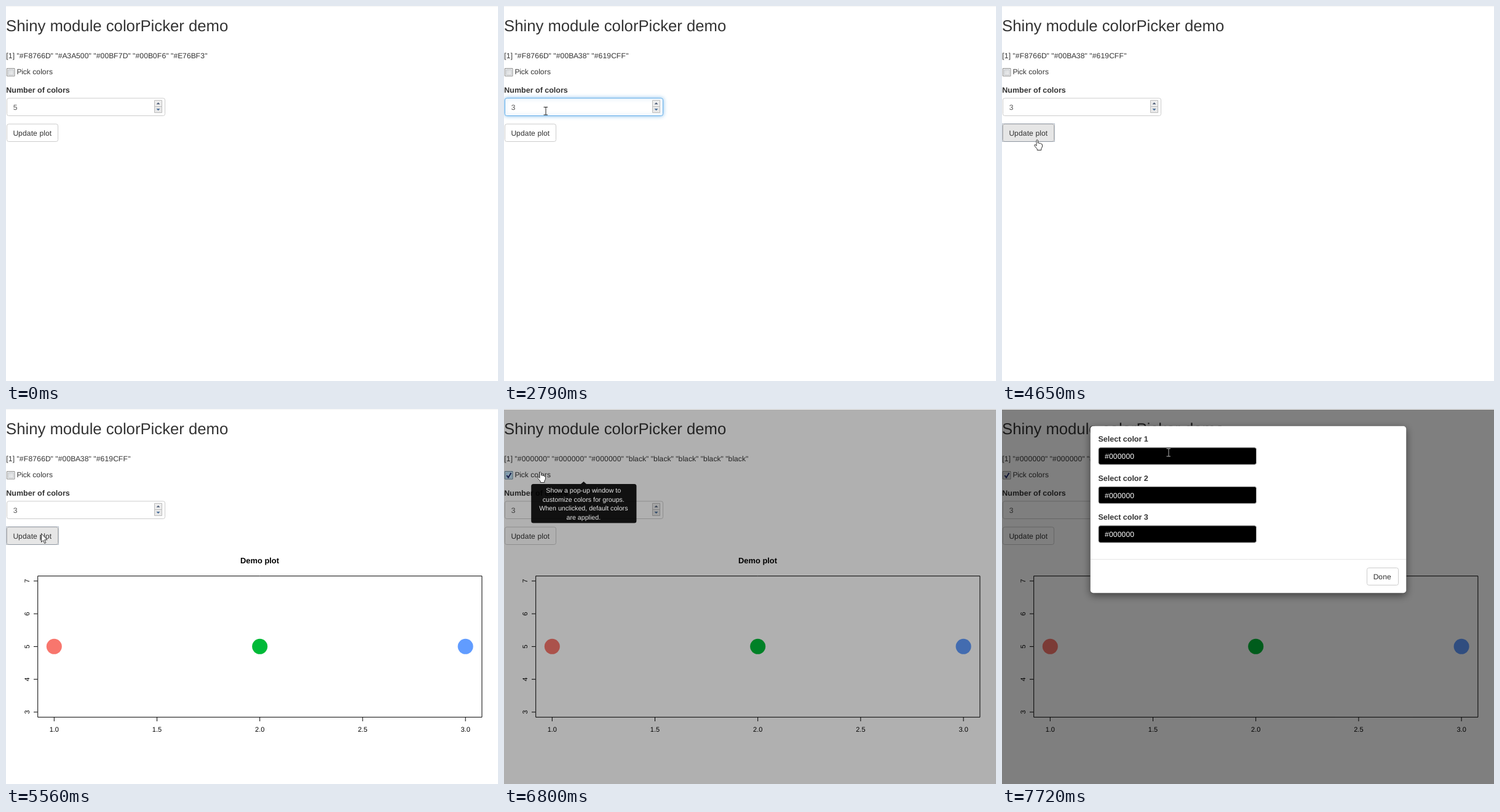
An HTML page with a canvas for the animation above (8000 ms loop, 800x610 px).

```html
<!DOCTYPE html>
<html lang="en">
<head>
<meta charset="utf-8">
<title>Color picker demo</title>
<style>
  html, body { margin: 0; width: 100%; height: 100%; overflow: hidden; background: #fff; }
  canvas { display: block; }
</style>
</head>
<body>
<canvas id="stage" width="800" height="610"></canvas>
<script>
const ctx = document.getElementById('stage').getContext('2d');
const LOOP = 8000;
const ZOOM = 0.861;
const FONT = '"Liberation Sans", Arial, sans-serif';
const BLACKS = '"#000000" "#000000" "#000000" "black" "black" "black" "black" "black"';

// Each step lists what changes at its time; the rest carries over.
const steps = [
  { at: 0, codes: '"#F8766D" "#A3A500" "#00BF7D" "#00B0F6" "#E76BF3"', count: 5,
    cursor: null, click: false, focus: false, caret: false, check: 'idle', checked: false,
    button: 'idle', tip: 0, plot: false, dim: 0, modal: false },
  { at: 300, cursor: ['arrow', 349, 70] },
  { at: 920, cursor: ['arrow', 233, 184] },
  { at: 1250, cursor: ['arrow', 240, 175] },
  { at: 1850, cursor: ['arrow', 246, 171], click: true, focus: true, caret: true, count: 4,
    codes: '"#F8766D" "#7CAE00" "#00BFC4" "#C77CFF"' },
  { at: 2170, click: false, count: 3, codes: '"#F8766D" "#00BA38" "#619CFF"' },
  { at: 2790, cursor: ['beam', 68, 164, '#222'], caret: false },
  { at: 3080, cursor: ['arrow', 61, 117], caret: true },
  { at: 3720, cursor: ['hand', 54, 113], caret: false, check: 'hover', tip: 0.9 },
  { at: 4020, cursor: ['hand', 52, 214], check: 'idle', tip: 0, button: 'hover' },
  { at: 4650, cursor: ['hand', 52, 217], focus: false, button: 'pressed' },
  { at: 4950, plot: true },
  { at: 5560, cursor: ['arrow', 57, 202] },
  { at: 5890, cursor: ['hand', 54, 103], check: 'hover', tip: 0.5, button: 'focus' },
  { at: 6500, cursor: ['arrow', 57, 102], click: true, check: 'down', tip: 0.9, button: 'idle' },
  { at: 6800, cursor: ['hand', 54, 102], click: false, check: 'hover', checked: true,
    codes: BLACKS, dim: 0.31 },
  { at: 7410, check: 'idle', dim: 0.5, modal: true },
  { at: 7720, cursor: ['beam', 271, 64, '#b4b4b4'], tip: 0 }
];

function stateAt(t) {
  return Object.assign({}, ...steps.filter(s => s.at <= t));
}

function text(str, x, y, size, color = '#333', align = 'left', weight = '') {
  ctx.font = `${weight} ${size}px ${FONT}`;
  ctx.textRendering = 'geometricPrecision';
  ctx.textAlign = align;
  ctx.fillStyle = color;
  ctx.fillText(str, x, y);
}

// Body text: 14px letters with whole-pixel advances, then zoomed.
function body(str, x, y, color) {
  let pen = 0;
  ctx.save();
  ctx.translate(x, y);
  ctx.scale(ZOOM, ZOOM);
  for (const letter of String(str)) {
    text(letter, pen, 0, 14, color);
    pen += Math.round(ctx.measureText(letter).width);
  }
  ctx.restore();
}

function rect(x, y, w, h, r, fill, stroke) {
  ctx.beginPath();
  ctx.roundRect(x, y, w, h, r);
  if (fill) { ctx.fillStyle = fill; ctx.fill(); }
  if (stroke) { ctx.strokeStyle = stroke; ctx.lineWidth = 1; ctx.stroke(); }
}

function line(x1, y1, x2, y2, color = '#000') {
  ctx.beginPath();
  ctx.moveTo(x1, y1);
  ctx.lineTo(x2, y2);
  ctx.strokeStyle = color;
  ctx.lineWidth = 1;
  ctx.stroke();
}

function polygon(points, fill) {
  ctx.beginPath();
  points.forEach(([x, y]) => ctx.lineTo(x, y));
  ctx.closePath();
  ctx.fillStyle = fill;
  ctx.fill();
}

function dot(x, y, r, fill) {
  ctx.beginPath();
  ctx.arc(x, y, r, 0, Math.PI * 2);
  ctx.fillStyle = fill;
  ctx.fill();
}

function checkbox(s) {
  const [edge, inner, from, to] = {
    idle: ['#8e8f8f', '#c3c7cb', '#d3d6d9', '#f3f3f3'],
    hover: ['#5586a3', '#8fcdf5', '#b1dffd', '#e9f7fe'],
    down: ['#2c628b', '#7cc3d3', '#a0d4e0', '#dff2f5']
  }[s.check];
  const shade = ctx.createLinearGradient(3, 103, 13, 113);
  shade.addColorStop(0, from);
  shade.addColorStop(1, to);
  rect(1.5, 101.5, 12.5, 12.5, 0, '#f4f4f4', edge);
  rect(3.5, 103.5, 8.5, 8.5, 0, shade, inner);
  if (!s.checked) return;
  ctx.beginPath();
  ctx.moveTo(4.5, 108);
  ctx.lineTo(7, 111.5);
  ctx.lineTo(11.5, 104);
  ctx.strokeStyle = '#212a6b';
  ctx.lineWidth = 2;
  ctx.stroke();
}

function spinner() {
  rect(241.5, 153.5, 12, 10, 0, '#ededed', '#bdbdbd');
  rect(241.5, 163.5, 12, 10, 0, '#e8e8e8', '#bdbdbd');
  polygon([[244.5, 160], [250.5, 160], [247.5, 156.7]], '#56647c');
  polygon([[244.5, 167], [250.5, 167], [247.5, 170.3]], '#4a6f9a');
}

function numberInput(s) {
  ctx.save();
  if (s.focus) {
    ctx.shadowColor = 'rgba(102,175,233,.8)';
    ctx.shadowBlur = 6;
  }
  rect(1.5, 150, 257, 28.5, 3, '#fff', s.focus ? '#66afe9' : '#ccc');
  ctx.restore();
  body(s.count, 11.8, 168.5, '#555');
  if (s.caret) line(19.5, 156, 19.5, 172, '#222');
  spinner();
}

function updateButton(state) {
  const border = { idle: '#ccc', focus: '#8c8c8c' }[state] || '#adadad';
  rect(1.5, 192, 83, 28.5, 3, state === 'idle' ? '#fff' : '#e6e6e6', border);
  if (state === 'pressed' || state === 'focus') {
    ctx.setLineDash([1, 1]);
    rect(0.5, 191.5, 85, 29, 0, null, '#6f7f92');
    ctx.setLineDash([]);
  }
  body('Update plot', 11.4, 210.5);
}

function plot() {
  text('Demo plot', 412.5, 251, 12.9, '#000', 'center', 'bold');
  rect(51.7, 271.7, 722.2, 229.6, 0, null, '#000');
  for (let i = 0; i < 5; i++) {
    const x = 78.3 + i * 167.2, y = 493 - i * 53.3;
    line(x, 501, x, 508);
    line(45, y, 51, y);
    text((1 + i / 2).toFixed(1), x, 525, 11, '#000', 'center');
    ctx.save();
    ctx.translate(38, y);
    ctx.rotate(-Math.PI / 2);
    text(3 + i, 0, 0, 11, '#000', 'center');
    ctx.restore();
  }
  ['#f8766d', '#00ba38', '#619cff'].forEach((c, i) => dot(78.3 + i * 334.4, 386.3, 12.5, c));
}

function modal() {
  ctx.save();
  ctx.shadowColor = 'rgba(0,0,0,.5)';
  ctx.shadowBlur = 13;
  ctx.shadowOffsetY = 4;
  rect(143.5, 27.5, 514, 272, 5, '#fff');
  ctx.restore();
  rect(143.5, 27.5, 514, 272, 5, null, 'rgba(0,0,0,.25)');
  for (let i = 0; i < 3; i++) {
    const y = i * 63.5;
    text('Select color ' + (i + 1), 156.5, 53 + y, 12.5, '#333', 'left', 'bold');
    rect(157, 62.8 + y, 256.5, 27.5, 3, '#000', '#aaa');
    body('#000000', 167, 81 + y, '#fff');
  }
  line(144, 244.5, 657, 244.5, '#e5e5e5');
  rect(593.5, 258.5, 51, 28, 3, '#fff', '#ccc');
  body('Done', 603.7, 276.5);
}

function tooltip(alpha) {
  ctx.save();
  ctx.globalAlpha = alpha;
  rect(44.2, 122, 171.2, 63.5, 3.5, '#000');
  polygon([[125, 122], [134, 122], [129.5, 118]], '#000');
  ['Show a pop-up window to', 'customize colors for groups.',
   'When unclicked, default colors', 'are applied.']
    .forEach((str, i) => text(str, 129.3, 136 + i * 14.6, 10.65, '#fff', 'center'));
  ctx.restore();
}

const outlines = {
  arrow: new Path2D('M.5 .5V14.5L3.6 11.6L5.7 16.5L7.8 15.6L5.7 10.8H10Z'),
  hand: new Path2D('M4 1.5Q5.2 -.5 6.5 1.5V6Q8 5 9 6.5Q10.5 5.7 11.3 7.2Q13.5 6.8 13.5 9V12' +
    'L11.8 15V17.5H5.2V15.5L.8 10.5Q.5 8 2.5 8.7L4 10.5Z')
};

function drawCursor([kind, x, y, color]) {
  if (kind === 'beam') {
    line(x, y + 1, x, y + 13, color);
    line(x - 3.5, y + 0.5, x + 3, y + 0.5, color);
    line(x - 3.5, y + 13, x + 3, y + 13, color);
    return;
  }
  ctx.save();
  ctx.translate(x, y);
  ctx.fillStyle = '#fff';
  ctx.strokeStyle = '#333';
  ctx.lineWidth = 1;
  ctx.fill(outlines[kind]);
  ctx.stroke(outlines[kind]);
  ctx.restore();
}

function draw(t) {
  const s = stateAt(t);
  ctx.fillStyle = '#fff';
  ctx.fillRect(0, 0, 800, 610);
  ctx.fillStyle = '#f3f3f3';
  ctx.fillRect(0, 0, 800, 1);

  text('Shiny module colorPicker demo', 0, 41, 25.7);
  body('[1] ' + s.codes, 0.3, 85);
  checkbox(s);
  body('Pick colors', 17.5, 111);
  text('Number of colors', 0.3, 141, 12.5, '#333', 'left', 'bold');
  numberInput(s);
  updateButton(s.button);
  if (s.plot) plot();

  ctx.fillStyle = `rgba(0,0,0,${s.dim})`;
  ctx.fillRect(0, 1, 800, 609);
  if (s.modal) modal();
  if (s.tip) tooltip(s.tip);
  if (s.click) dot(s.cursor[1], s.cursor[2], 13, 'rgba(250,242,0,.55)');
  if (s.cursor) drawCursor(s.cursor);
}

const start = performance.now();
function tick() {
  draw((performance.now() - start) % LOOP);
  requestAnimationFrame(tick);
}
tick();
</script>
</body>
</html>
```
